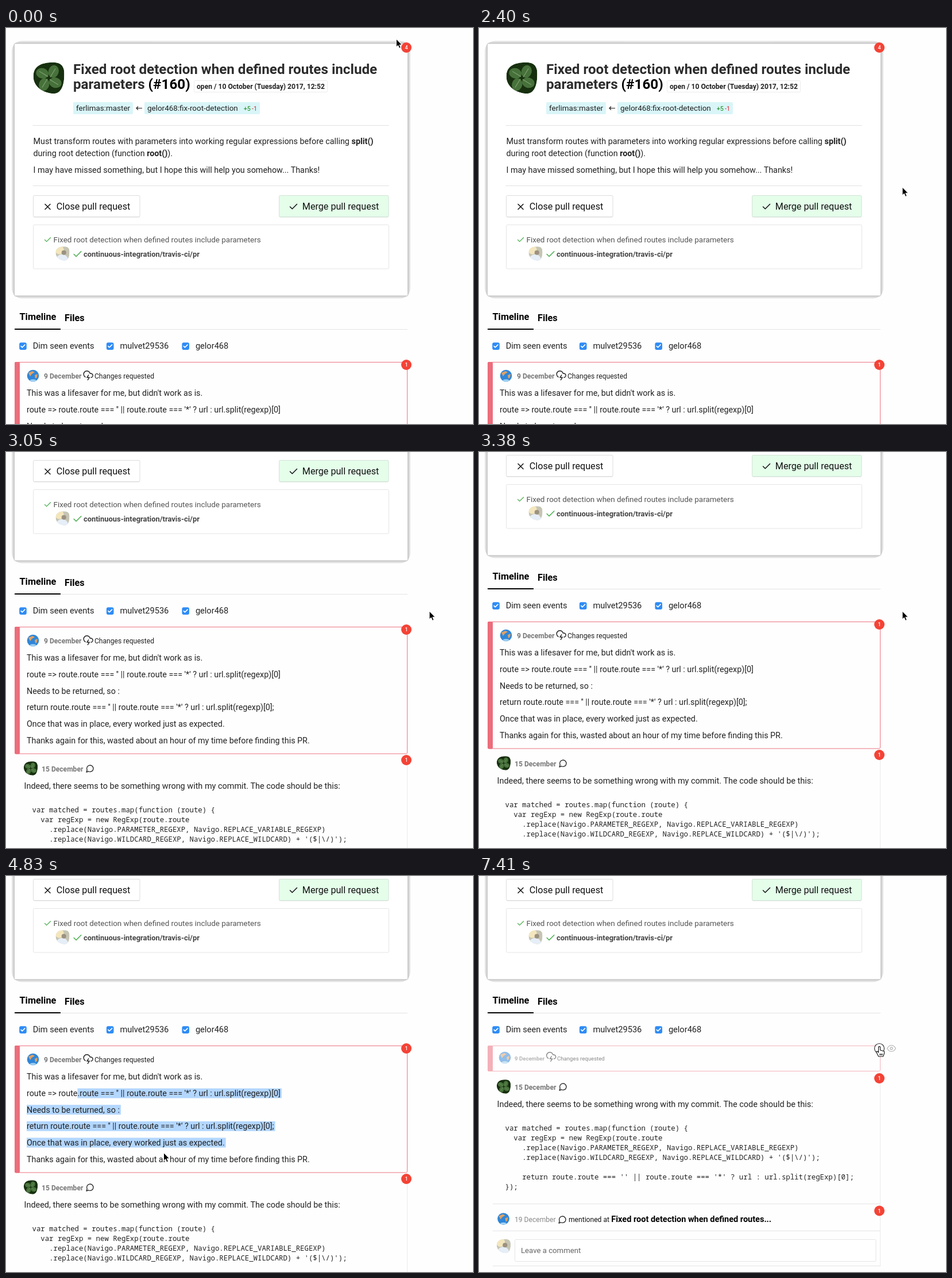
Animation, 813 px wide and 689 px high, one loop 8 s. Source, as an HTML page:

```html
<!DOCTYPE html>
<html lang="en">
<head>
<meta charset="utf-8">
<title>Pull request</title>
<style>
html, body { margin: 0; width: 100%; height: 100%; overflow: hidden; background: #fefefe; }
svg { display: block; width: 813px; height: 689px; font-family: Roboto, sans-serif; }
.code { font-family: "Noto Sans Mono", monospace; }
</style>
</head>
<body>
<svg viewBox="0 0 813 689"></svg>
<script>
const LOOP = 8000, CLICK = 7410, SCROLL = 286, FOLD = 175, LINE = 28.65;
const SMALL = 12.1, BODY = 14.35, MID = 13.45, BIG = 16.15;
const RED = '#f44336', PINK = '#ec7482', RULE = '#e4e4e4', MINT = '#d9f5f8';

const ICONS = {
  check: 'M20 6L9 17 4 12',
  cross: 'M18 6L6 18M6 6l12 12',
  storm: 'M19 17A5 5 0 0 0 18 7h-1.3a8 8 0 1 0-11.6 9M13 11l-4 6h6l-4 6',
  bubble: 'M3 21l1.9-5.7A8.5 8.5 0 1 1 8.7 19.1z',
  eye: 'M1 12s4-8 11-8 11 8 11 8-4 8-11 8-11-8-11-8zM9 12a3 3 0 1 0 6 0 3 3 0 1 0-6 0'
};

const text = (x, y, size, str, fill = '#222', attrs = '') =>
  `<text x="${x}" y="${y}" font-size="${size}" fill="${fill}" ${attrs}>${str}</text>`;
const bold = (x, y, size, str, fill = '#222') => text(x, y, size, str, fill, 'font-weight="700"');
const b = str => `<tspan font-weight="700">${str}</tspan>`;
const rect = (x, y, w, h, fill, stroke = 'none', r = 2) =>
  `<rect x="${x}" y="${y}" width="${w}" height="${h}" rx="${r}" fill="${fill}" stroke="${stroke}"/>`;
const path = (d, stroke, width = 1, fill = 'none', attrs = '') =>
  `<path d="${d}" stroke="${stroke}" stroke-width="${width}" fill="${fill}" ${attrs}/>`;
const icon = (name, x, y, size, color = '#222', width = 2) =>
  `<g transform="translate(${x} ${y}) scale(${size / 24})" stroke-linecap="round" stroke-linejoin="round">${path(ICONS[name], color, width)}</g>`;
const pic = (id, x, y, scale = 1) =>
  `<use href="#${id}" transform="translate(${x} ${y}) scale(${scale})"/>`;
const badge = (y, n) => `<circle cx="697" cy="${y}" r="9" fill="${RED}"/>` +
  text(697, y + 3.2, 9, n, '#fff', 'text-anchor="middle" font-weight="500"');
const dots = y => path(`M47 ${y}H667`, '#c4c4c4', 1, 'none', 'stroke-dasharray="1 1"');
const rule = (x, y) => path(`M${x} ${y}H699`, RULE);

const BLOB = 'M-27-3C-27-20-14-26 2-27S27-24 27-7 23 26 10 27-27 19-27-3Z';
const leaf = (_, i) => `<g transform="rotate(${15 + i * 90})">` +
  '<ellipse cx="-13" cy="-5" rx="11" ry="9" fill="#47713a"/>' + path('M-2-2L-19-7', '#86a878') + '</g>';
const defs = `<defs>
  <clipPath id="blob"><path d="${BLOB}"/></clipPath>
  <g id="clover" clip-path="url(#blob)"><path d="${BLOB}" fill="#17300f"/>${[...'1234'].map(leaf).join('')}</g>
  <g id="person" clip-path="url(#blob)"><path d="${BLOB}" fill="#c6c5b4"/>
    <circle cx="-12" cy="-14" r="17" fill="#f3e6bd"/>
    <ellipse cx="-2" cy="24" rx="23" ry="21" fill="#e6eef7"/><circle cx="5" cy="-4" r="9" fill="#9c9181"/></g>
  <g id="globe"><circle r="10.3" fill="#2f86d8"/>
    <path d="M-8-5L-1-8 3-6-2-3-5 1Z M3-1L8-3 7 3 4 5Z" fill="#e0a264"/>
    <ellipse cy="8" rx="5" ry="1.8" fill="#a5d3f2"/></g>
</defs>`;

// soft halo: nested outlines, darker towards the sheet
const halo = ['#e6e6e6', '#d8d8d8', '#c6c6c6'].map((color, i) => {
  const grow = 5 - i * 1.8;
  return rect(15 - grow, 27.5 - grow, 684 + 2 * grow, 438 + 2 * grow, color, 'none', 18 - i * 7);
}).join('');
const button = (x, w, name, label, fill, border) =>
  rect(x, 292, w, 37.5, border) + rect(x, 291.5, w, 37, fill, border) +
  icon(name, x + 16, 302, 18, '#111') + text(x + 40.3, 316, BIG, label, '#111');

const summary = halo + rect(15, 27.5, 684, 438, '#fff', 'none', 0) +
  badge(34, 4) + pic('clover', 74.5, 87) +
  bold(117, 80, 24.2, 'Fixed root detection when defined routes include', '#2c2c2c') +
  bold(117, 105.5, 24.2, 'parameters <tspan fill="#000">(#160)</tspan>', '#2c2c2c') +
  rect(327.5, 91.5, 232, 20, '#fff', '#ececec') +
  bold(332, 105.5, SMALL, 'open / 10 October (Tuesday) 2017, 12:52') +
  rect(117, 129, 104, 21, MINT) + rect(241, 129, 201, 21, MINT) +
  text(122, 144, MID, 'ferlimas:master') +
  path('M237 139.5H227M230 136.5l-3 3 3 3', '#222', 1.2) +
  text(246, 144, MID, 'gelor468:fix-root-detection') +
  text(413.7, 144, 10.76, '+5', '#128a12') + text(428, 144, 10.76, '-1', '#e0202c') +
  dots(169.5) +
  text(47.5, 201.5, BODY, `Must transform routes with parameters into working regular expressions before calling ${b('split()')}`) +
  text(47.5, 222.7, BODY, `during root detection (function ${b('root()')}).`) +
  text(47.5, 251.5, BODY, 'I may have missed something, but I hope this will help you somehow... Thanks!') +
  dots(274.5) +
  button(47.5, 185.5, 'cross', 'Close pull request', '#fff', '#dcdcdc') +
  button(475.5, 190.5, 'check', 'Merge pull request', '#e4feea', '#d3e2d6') +
  rect(47.5, 342.5, 619, 76.5, '#fff', '#e5e5e5') +
  icon('check', 65, 361, 15, '#4caf50') +
  text(82.5, 372.5, MID, 'Fixed root detection when defined routes include parameters', '#555') +
  pic('person', 98.5, 392.5, .45) + icon('check', 115, 384, 19, '#4caf50') +
  bold(135, 397.5, 12.92, 'continuous-integration/travis-ci/pr', '#444');

const checkbox = (x, label) => rect(x - 6.3, 547.3, 12.6, 12.6, '#2f8cf5', 'none', 3) +
  icon('check', x - 5, 548.7, 10, '#fff', 4) + text(x + 17.2, 558.3, 14.6, label);
const tabs = bold(23.5, 508, 16.3, 'Timeline', '#000') + bold(102, 510, 16.3, 'Files', '#000') +
  rule(95, 524.5) + rect(15, 523, 80, 2, '#000', 'none', 0) +
  checkbox(29.5, 'Dim seen events') + checkbox(181.2, 'mulvet29536') + checkbox(312.7, 'gelor468');

const frame = h => rect(15.5, 581.5, 683, h, 'none', PINK) + rect(15, 581, 9, h + 1, '#ec6d7c');
const review = [
  "This was a lifesaver for me, but didn't work as is.",
  "route => route.route === '' || route.route === '*' ? url : url.split(regexp)[0]",
  'Needs to be returned, so :',
  "return route.route === '' || route.route === '*' ? url : url.split(regexp)[0];",
  'Once that was in place, every worked just as expected.',
  'Thanks again for this, wasted about an hour of my time before finding this PR.'
];
const openCard = frame(220.5) + badge(586, 1) + pic('globe', 47, 605) +
  bold(66, 610, SMALL, '9 December', '#777') + icon('storm', 134.5, 596, 17) +
  text(154, 610, SMALL, 'Changes requested') +
  review.map((s, i) => text(36, 640.4 + i * LINE, 14.3, s, '#222', 'class="line"')).join('');
const foldedCard = `<g opacity=".53">${frame(44)}${pic('globe', 45, 602)}` +
  bold(62, 606.5, 9.65, '9 December', '#777') + icon('storm', 117, 592, 17) +
  text(136, 606.5, 9.65, 'Changes requested') + '</g>' +
  '<circle cx="697" cy="586" r="8.5" fill="#fff" stroke="#333" stroke-width="1.2"/>' +
  path('M697 582v7', '#333', 1.3) + icon('eye', 710, 578, 16, '#bbb');

const code = `var matched = routes.map(function (route) {
  var regExp = new RegExp(route.route
    .replace(Navigo.PARAMETER_REGEXP, Navigo.REPLACE_VARIABLE_REGEXP)
    .replace(Navigo.WILDCARD_REGEXP, Navigo.REPLACE_WILDCARD) + '($|\\/)');

    return route.route === '' || route.route === '*' ? url : url.split(regExp)[0];
});`.split('\n');
const codeLine = (s, i) => text(45.5 + s.search(/\S|$/) * 7.41, 903.5 + i * 17, 12.35, s.trim(), '#222', 'class="code"');
const rest = path('M698.5 803V1140', '#ebebeb') + badge(813, 1) + pic('clover', 43, 827.5, .45) +
  bold(62, 833, SMALL, '15 December', '#777') + icon('bubble', 138, 820, 16) +
  text(31.5, 863.3, 14.45, 'Indeed, there seems to be something wrong with my commit. The code should be this:') +
  code.map(codeLine).join('') +
  rule(24, 1031.5) + badge(1043.5, 1) + pic('globe', 42.5, 1057.5) +
  text(62, 1063, SMALL, '19 December', '#888') + icon('bubble', 137, 1051, 16) +
  text(156, 1063, SMALL, 'mentioned at', '#111') +
  bold(230.3, 1063, 14.5, 'Fixed root detection when defined routes...', '#000') +
  rule(24, 1078.5) + pic('person', 43, 1105, .45) +
  rect(62.5, 1093.5, 628.5, 38, '#fff', '#e5e5e5') +
  text(73, 1117, 13.2, 'Leave a comment', '#666') + rule(24, 1139.5);

const svg = document.querySelector('svg');
svg.innerHTML = defs + `<g id="page">${summary}${tabs}<g id="marks"></g>
  <g id="open">${openCard}</g><g id="folded">${foldedCard}</g><g id="rest">${rest}</g></g>
  <g id="arrow">${path('M0 0V14L3.2 11.2 5.4 16.3 7.9 15.2 5.7 10.3H10Z', '#fff', 1, '#000')}</g>
  <g id="beam">${path('M-3-8Q0-8 0-6.5Q0-8 3-8M0-6.5V6.5M-3 8Q0 8 0 6.5Q0 8 3 8', '#222', 1.1)}</g>
  <g id="hand" stroke-linejoin="round">${path('M-1.5 0h3v6l7 2v4l-2 5h-8l-4-8 2-1 2 2zM1 12v3m2-3v3m2-3v3', '#111', 1.1, '#fff')}</g>`;
const $ = id => document.getElementById(id);
const lines = [...document.querySelectorAll('.line')];
const show = (id, on) => $(id).setAttribute('display', on ? 'inline' : 'none');
const move = (id, x, y) => $(id).setAttribute('transform', `translate(${x} ${y})`);
const progress = (t, from, to) => Math.min(1, Math.max(0, (t - from) / (to - from)));
const mix = (a, z, p) => a + (z - a) * p;

// pointer legs: start, end, and where it arrives
const LEGS = [
  [2010, 2400, 737, 277], [3480, 3820, 301, 409], [3970, 4330, 124, 374.5], [4430, 4830, 274.5, 481.5],
  [5430, 5680, 307.5, 481.5], [6110, 6620, 711, 300], [6620, 6750, 697, 297]
];

function pointer(t) {
  // nearly two sinking turns round the badge, then the legs
  const u = progress(t, 20, 1610), angle = (u * 644 - 150) * Math.PI / 180, r = 25 - 2 * u;
  let x = 701 - 3 * u + r * Math.cos(angle), y = 31.5 + 8 * u + r * Math.sin(angle);
  for (const [from, to, endX, endY] of LEGS) {
    const p = progress(t, from, to), eased = p * p * (3 - 2 * p);
    x = mix(x, endX, eased);
    y = mix(y, endY, eased);
  }
  return [x, y];
}

// accelerating wheel scroll in 90 ms ticks, with a short last nudge
function scroll(t) {
  const ticked = from => from + Math.floor((t - from) / 90) * 90;
  const rush = progress(ticked(2780), 2690, 3050) ** 3.3, nudge = progress(ticked(3290), 3200, 3380);
  return Math.round((SCROLL - 9) * rush + 9 * nudge);
}

function selection(t, x, y) {
  if (t < 4450 || t >= 5860) return '';
  return lines.slice(1, 5).map((line, i) => {
    const top = 368 + i * LINE, end = 38 + line.getComputedTextLength();
    const start = i ? 36 : 36 + line.getSubStringLength(0, 'route => route'.length);
    const stop = y > top + 21 ? end : y < top ? start : Math.min(x, end);
    return stop > start ? rect(start, top + SCROLL + 1.5, stop - start, 17, '#b3d7ff', 'none', 0) : '';
  }).join('');
}

function draw(now) {
  const t = now % LOOP, folded = t >= CLICK, scrolled = t >= 3380;
  const [x, y] = pointer(t);
  move('page', 0, -scroll(t));
  move('rest', 0, folded ? -FOLD : 0);
  show('open', !folded);
  show('folded', folded);
  $('marks').innerHTML = selection(t, x, y);

  const overBadge = Math.hypot(x - 697, y - (scrolled ? 300 : 34)) < 9;
  const overText = scrolled && x > 36 && x < 690 && y > 339 && y < 503 && (y - 339) % LINE < 21;
  const kind = overBadge ? 'hand' : overText ? 'beam' : 'arrow';
  for (const id of ['arrow', 'beam', 'hand']) show(id, id === kind);
  move(kind, x, y);
}

const begin = performance.now();
(function tick() {
  draw(performance.now() - begin);
  requestAnimationFrame(tick);
})();
</script>
</body>
</html>
```
